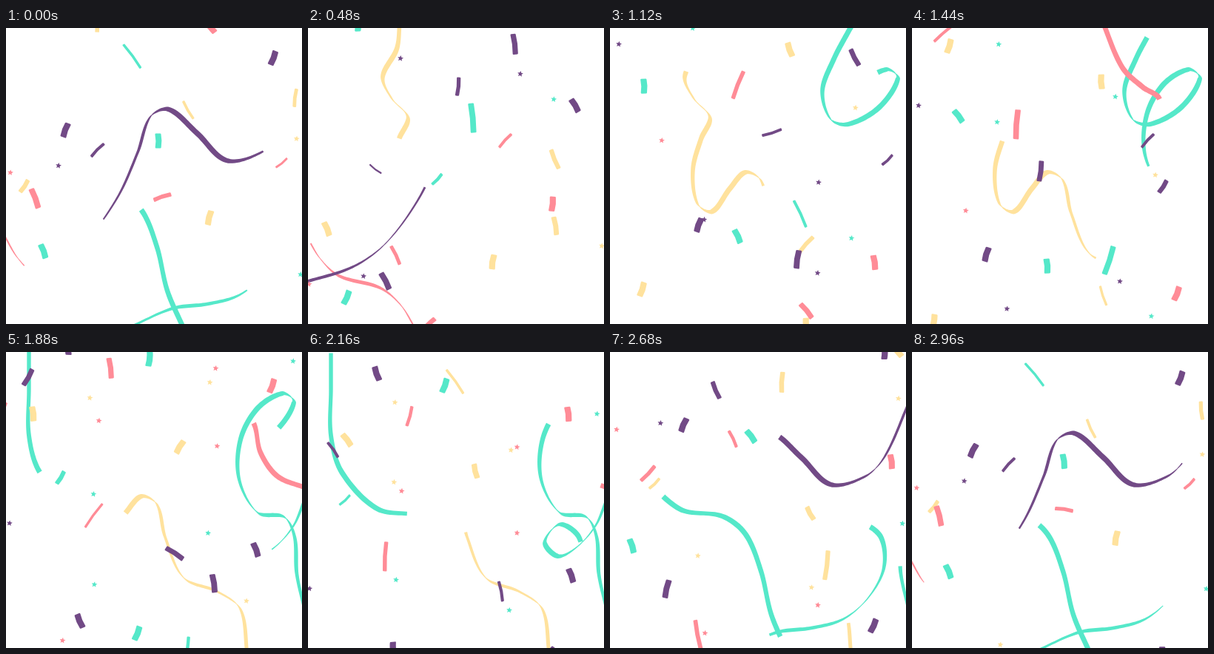
Recreate the animation shown at these times as an HTML page with a canvas. Size 400 px wide and 400 px high, loop 3000 ms.

```html
<!DOCTYPE html>
<html lang="en">
<head>
<meta charset="utf-8">
<title>Confetti</title>
<style>
html, body { margin: 0; width: 100%; height: 100%; overflow: hidden; background: #fff; }
canvas { display: block; width: 100vw; height: 100vh; }
</style>
</head>
<body>
<canvas id="c" width="400" height="400"></canvas>
<script>
const ctx = document.getElementById('c').getContext('2d');
const LOOP = 3000, STEP = 40;
const PURPLE = '#724a86', TEAL = '#55e8c9', YELLOW = '#ffe29d', RED = '#ff8c97';
const stars = [], strips = [], ribbons = [];

// Smooth curve through evenly spaced values, straight beyond the ends
function curve(values, pos) {
  const last = values.length - 1;
  const i = Math.max(0, Math.min(last - 1, Math.floor(pos))), u = pos - i;
  const b = values[i], c = values[i + 1];
  const a = i ? values[i - 1] : 2 * b - c;
  const d = i + 2 <= last ? values[i + 2] : 2 * c - b;
  return b + u * ((c - a) / 2 + u * (a - 2.5 * b + 2 * c - d / 2 + u * (1.5 * (b - c) + (d - a) / 2)));
}

// Flutter paths that strips share: one value every `step` seconds
const SLOW = {
  step: 0.3, len: 20,
  x: [66, 57, 46, 62, 76, 66, 31, 27, 48, 53, 51, 32],
  y: [0, 38, 79, 117, 153, 185, 219, 255, 292, 330, 370, 411],
  deg: [0, 21, -2, -37, 0, 52, 28, -13, -24, 2, 24, 0],
  width: s => 8.3 - 6 * Math.exp(-(((s - 1.55) / 0.2) ** 2))
};
const MEDIUM = {
  step: 0.25, len: 28,
  x: [278, 279, 266, 217, 177, 180, 228, 260, 250, 232],
  y: [-2, 57, 111, 143, 181, 236, 272, 317, 376, 430],
  deg: [-12, 2, 30, 72, 18, -25, -57, -16, 25, 20],
  width: s => 5.7 - 2.3 * Math.cos((s - 0.6) * 4.6)
};
const LONG = {
  step: 0.4, len: 40,
  x: [146, 194, 232, 251, 267, 248, 230],
  y: [0, 75, 143, 227, 306, 388, 470],
  deg: [-52, -22, -4, -36, 16, 10, 0],
  width: s => 5.6 - 2.2 * Math.cos((s - 0.15) * 6)
};
const FAST = {
  step: 0.2, len: 25,
  x: [33, 29, 34, 65, 86, 64, 18],
  y: [2, 58, 132, 198, 275, 349, 414],
  deg: [35, 20, -35, -62, -177, -150, -132],
  width: s => 6 + 2 * Math.cos((s - 0.95) * 6.3)
};

// A mirrored strip runs the same path from the right
const strip = (path, color, x, start, mirror = 1, rate = 1) =>
  strips.push({ path, color, x, start, mirror, rate });

strip(SLOW, TEAL, 130, 1805);
strip(SLOW, TEAL, 0, 523);
strip(SLOW, PURPLE, 305, 2680);
strip(SLOW, PURPLE, 152, 1928, -1);
strip(SLOW, RED, 305, 1522);
strip(SLOW, YELLOW, -10, 1245);
strip(SLOW, YELLOW, 302, 888, -1);
strip(MEDIUM, PURPLE, 0, 380);
strip(MEDIUM, RED, -138, 1780);
strip(MEDIUM, YELLOW, 512, 2500, -1);
strip(LONG, TEAL, 0, 2800);
strip(LONG, RED, 368, 710, -1);
strip(LONG, RED, 194, 1412, -1);
strip(LONG, YELLOW, 27, 2076, 1, 2.5);
strip(FAST, PURPLE, 172, 2500, -1);
strip(FAST, PURPLE, 174, 220);
strip(FAST, PURPLE, 360, 980, -1);
strip(FAST, PURPLE, 0, 1760);
strip(FAST, RED, 308, 20, -1);
strip(FAST, RED, 135, 2320);
strip(FAST, YELLOW, 420, 2700, -1);

function drawStrip(o, t) {
  const { path, mirror } = o;
  const s = (t - o.start) / 1000 * o.rate, pos = s / path.step;
  if (s < -0.25 || pos > path.x.length - 1) return;
  const width = path.width(s), edge = Math.min(2.4, width * 0.6);
  const w = (width - edge) / 2, h = (path.len - edge) / 2, bend = 0.8 * mirror;
  ctx.save();
  ctx.translate(o.x + mirror * curve(path.x, pos), curve(path.y, pos));
  ctx.rotate(mirror * curve(path.deg, pos) * Math.PI / 180);
  ctx.beginPath();
  ctx.moveTo(-w - bend / 2, -h);
  ctx.lineTo(w - bend / 2, -h);
  ctx.quadraticCurveTo(w + bend * 1.5, 0, w - bend / 2, h);
  ctx.lineTo(-w - bend / 2, h);
  ctx.quadraticCurveTo(-w + bend * 1.5, 0, -w - bend / 2, -h);
  ctx.closePath();
  ctx.fillStyle = ctx.strokeStyle = o.color;
  ctx.lineWidth = edge;
  ctx.lineJoin = 'round';
  ctx.fill();
  ctx.stroke();
  ctx.restore();
}

// Stars fall with one gravity; each has its entry speed, drift and moment
const star = (speed, drift, x, color, start) => stars.push({ speed, drift, x, color, start });

star(240, 8.5, 65, PURPLE, 2302);
star(240, 8.5, 65, RED, 540);
star(240, -9.5, 12.8, RED, 2270);
star(240, -9.5, 12.8, PURPLE, 1030);
star(240, 9, 387.5, TEAL, 1829);
star(240, 9, 387.5, YELLOW, 2428);
star(240, -9, 335.5, TEAL, 101);
star(240, -9, 335.5, YELLOW, 699);
star(306, 3.5, 124.5, PURPLE, 348);
star(306, 3.5, 124.5, RED, 1587);
star(306, -4, 276, TEAL, 1147);
star(306, -4, 276, YELLOW, 1748);
star(365, -3, 283.5, PURPLE, 579);
star(365, -3, 283.5, RED, 1820);
star(365, 2.5, 117, TEAL, 1380);
star(365, 2.5, 117, YELLOW, 1977);
star(384, -10, 288.5, PURPLE, 321);
star(384, -10, 288.5, RED, 1559);
star(384, 10, 111.8, TEAL, 1119);
star(384, 10, 111.8, YELLOW, 1721);

function drawStar(o, t) {
  const s = (t - o.start) / 1000;
  if (s < -0.05 || s > 1.6) return;
  const x = o.x + o.drift * s, y = o.speed * s + 38 * s * s;
  ctx.fillStyle = o.color;
  ctx.beginPath();
  for (let i = 0; i < 10; i++) {
    const a = i * Math.PI / 5 - Math.PI / 2 + 0.15, r = i % 2 ? 1.9 : 4.1;
    ctx.lineTo(x + r * Math.cos(a), y + r * Math.sin(a));
  }
  ctx.fill();
}

// Ribbons slide along a path at a steady speed. The width is that of a flat
// nib: thin along its angle, thick across it.
function ribbon(color, nib, start, speed, length, ...points) {
  const gap = (a, b) => Math.hypot(b[0] - a[0], b[1] - a[1]) || 1;
  const slope = (i, j) => {
    const a = points[i - 1] || points[i], p = points[i], b = points[i + 1] || p;
    const span = (i ? gap(a, p) : 0) + (b === p ? 0 : gap(p, b));
    return (b[j] - a[j]) / span;
  };
  const line = [];
  let s = 0;
  for (let i = 0; i < points.length - 1; i++) {
    const p = points[i], q = points[i + 1], d = gap(p, q);
    for (let k = 0; k < 16; k++) {
      const u = k / 16, u2 = u * u, u3 = u2 * u;
      const [x, y] = [0, 1].map(j => p[j] + (q[j] - p[j]) * (3 * u2 - 2 * u3)
        + d * (slope(i, j) * (u3 - 2 * u2 + u) + slope(i + 1, j) * (u3 - u2)));
      const prev = line[line.length - 1];
      if (prev) s += Math.hypot(x - prev.x, y - prev.y);
      line.push({ x, y, s });
    }
  }
  ribbons.push({ color, nib: nib * Math.PI / 180, start, speed, length, line });
}

ribbon(YELLOW, 45, 2960, 0.34, 323, [124, -8], [120, 28], [101, 66], [113, 95], [135, 121],
  [123, 150], [112, 192], [118, 237], [138, 248], [162, 217], [183, 195], [204, 206],
  [215, 250], [240, 305], [286, 324], [317, 348], [326, 408]);
ribbon(TEAL, 45, 454, 0.455, 420, [332, -12], [322, 5], [302, 43], [287, 85], [298, 123],
  [322, 130], [364, 107], [389, 68], [374, 56], [340, 76], [317, 118], [315, 172],
  [340, 217], [376, 223], [390, 250], [393, 300], [404, 350]);
ribbon(TEAL, -45, 1690, 0.44, 256, [404, 198], [389, 234], [364, 263], [338, 276], [320, 257],
  [340, 233], [366, 250], [370, 292], [349, 332], [315, 361], [272, 373], [225, 379], [168, 404]);
ribbon(TEAL, -45, 1442, 0.395, 274, [31, -8], [31, 50], [31, 113], [46, 163], [94, 212],
  [152, 222], [183, 246], [204, 296], [218, 355], [240, 406]);
ribbon(RED, -45, 1100, 0.4, 176, [257, -10], [284, 53], [312, 80], [334, 95], [344, 136],
  [367, 168], [406, 184]);
ribbon(RED, 52, 2837, 0.325, 193, [-4, 277], [16, 311], [42, 335], [97, 351], [125, 374], [145, 406]);
ribbon(PURPLE, -45, 2243, 0.6, 339, [404, 68], [372, 140], [345, 168], [298, 179], [258, 142],
  [220, 110], [195, 120], [178, 168], [150, 230], [105, 291], [60, 323], [-6, 344]);

function drawRibbon(o, t) {
  const head = (t - o.start) * o.speed, tail = head - o.length;
  const at = s => {
    const i = Math.max(1, o.line.findIndex(p => p.s >= s));
    const a = o.line[i - 1], b = o.line[i], u = (s - a.s) / (b.s - a.s);
    return { x: a.x + (b.x - a.x) * u, y: a.y + (b.y - a.y) * u };
  };
  const end = o.line[o.line.length - 1].s;
  const from = Math.max(0, tail), to = Math.min(end, head);
  if (to - from < 1) return;
  const pts = [at(from), ...o.line.filter(p => p.s > from + 0.4 && p.s < to - 0.4), at(to)];
  const left = [], right = [];
  pts.forEach((p, i) => {
    const a = pts[i - 1] || p, b = pts[i + 1] || p;
    const angle = Math.atan2(b.y - a.y, b.x - a.x);
    const half = (1 + 6.2 * Math.abs(Math.sin(angle - o.nib))) / 2;
    const nx = -Math.sin(angle) * half, ny = Math.cos(angle) * half;
    left.push([p.x + nx, p.y + ny]);
    right.unshift([p.x - nx, p.y - ny]);
  });
  ctx.fillStyle = o.color;
  ctx.beginPath();
  left.concat(right).forEach(p => ctx.lineTo(p[0], p[1]));
  ctx.fill();
}

function frame(now) {
  const t = Math.floor(now % LOOP / STEP) * STEP;
  ctx.fillStyle = '#fff';
  ctx.fillRect(0, 0, 400, 400);
  // Slow pieces outlive a loop, so earlier rounds are drawn too
  const each = (list, draw) => list.forEach(o => [0, 1, 2].forEach(n => draw(o, t + n * LOOP)));
  each(ribbons, drawRibbon);
  each(strips, drawStrip);
  each(stars, drawStar);
  requestAnimationFrame(frame);
}
requestAnimationFrame(frame);
</script>
</body>
</html>
```
